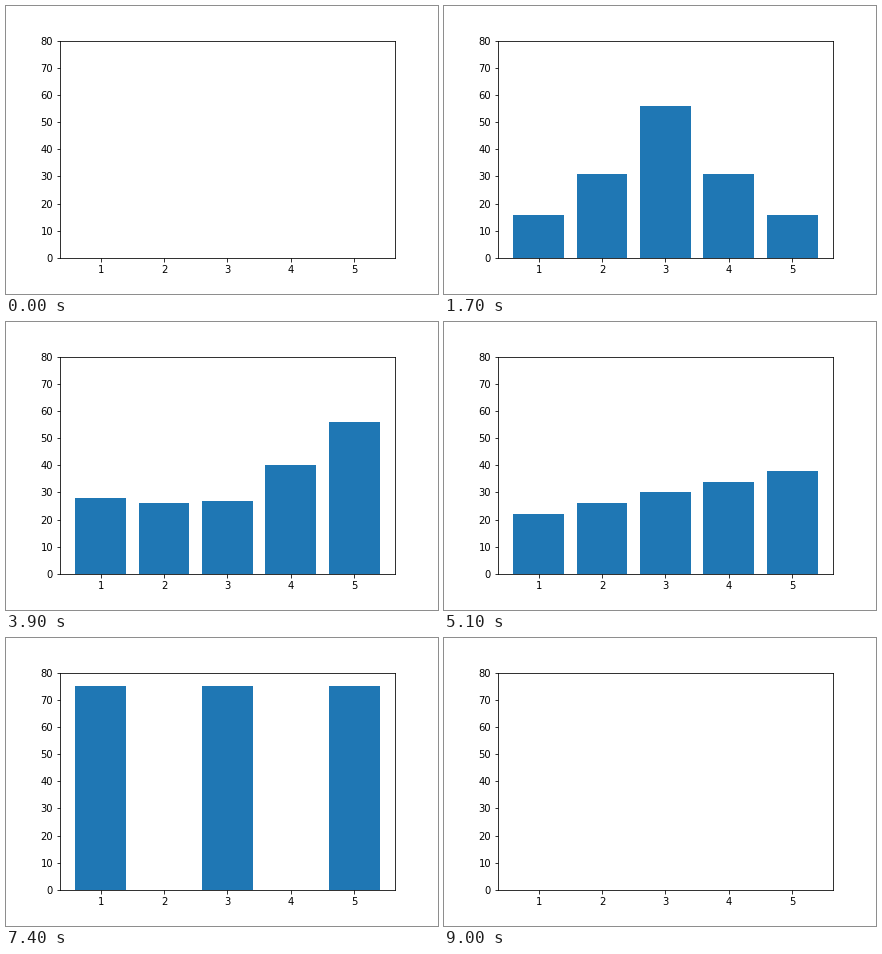
Recreate the animation shown at these times as a matplotlib script. Size 432x288 px, loop 9600 ms.

```python
import matplotlib.pyplot as plt
import numpy as np
from matplotlib.animation import FuncAnimation

STEP_MS = 100
CYCLE = 16   # frames per stage: a linear morph, then a hold
MORPH = 10   # frames spent moving

x = np.arange(1, 6)
d = abs(x - 3)   # distance from the middle bar

empty = 0 * x
peak = 60 - 35 * d + 5 * d**2
valley = 20 + 15 * d + 5 * d**2
rising = 10 * x
falling = rising[::-1]
comb = 75 * (x % 2)
shapes = [empty, peak, valley, rising, falling, comb, empty]

plt.rcParams.update({"font.family": "DejaVu Sans", "font.size": 10})

fig, ax = plt.subplots(figsize=(6, 4), dpi=72, facecolor="white")
fig.subplots_adjust(left=0.125, right=0.9, bottom=0.125, top=0.88)
bars = ax.bar(x, empty, width=0.8, color="#1f77b4")
ax.set_xlim(0.36, 5.64)
ax.set_ylim(0, 80)


def heights(frame):
    stage, step = divmod(frame - 1, CYCLE)
    t = min((step + 1) / MORPH, 1)
    return (1 - t) * shapes[stage] + t * shapes[stage + 1]


def update(frame):
    for bar, height in zip(bars, heights(frame)):
        bar.set_height(height)
    return list(bars)


anim = FuncAnimation(fig, update, frames=CYCLE * (len(shapes) - 1),
                     interval=STEP_MS, repeat=True, blit=False)
plt.show()
```
